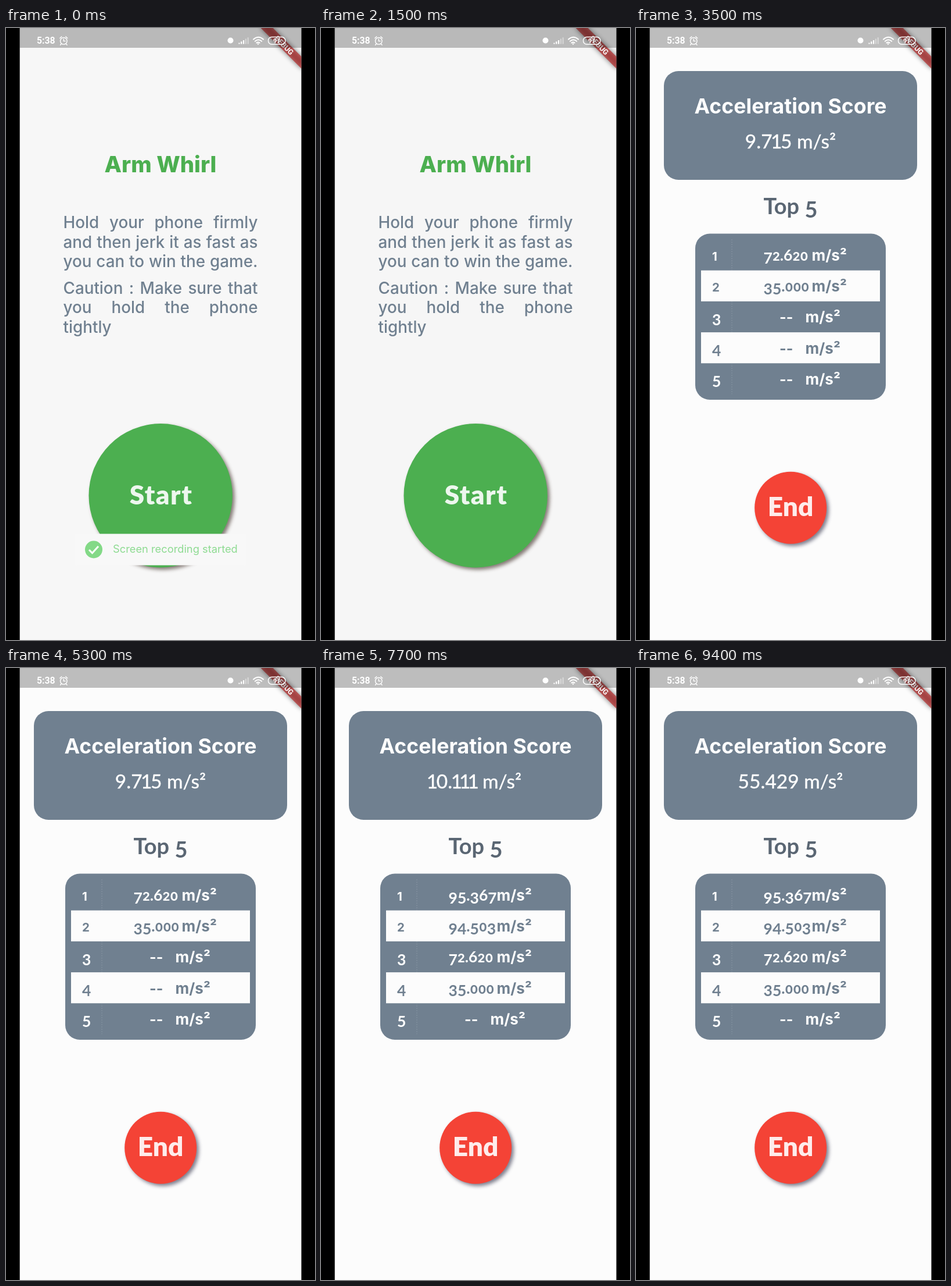
Animation, 532 px wide and 1052 px high, one loop 10000 ms. Source, as an HTML page:

```html
<!DOCTYPE html>
<html lang="en">
<head>
<meta charset="utf-8">
<title>Throw game</title>
<style>
  html, body { margin: 0; width: 100%; height: 100%; overflow: hidden; background: #000; }
  svg { display: block; width: 100vw; height: 100vh; }
  text { font-family: Inter, "Open Sans", sans-serif; white-space: pre; }
  .round, .digit { font-family: Lato, sans-serif; }
  .bold { font-weight: 700; }
  .button { font-weight: 900; font-size: 46px; fill: #fff; fill-opacity: .9; text-anchor: middle; }
  .body { font-weight: 500; font-size: 27.8px; fill: #708090; }
  .digit { font-size: 26.5px; }
  .small { font-size: 20.5px; }
  .mid { text-anchor: middle; }
  .status { font-family: Roboto, sans-serif; font-weight: 700; fill: #fff; }
</style>
</head>
<body>
<svg viewBox="0 0 532 1052">
  <defs>
    <clipPath id="screen"><rect x="23.700" width="484.800" height="1052"/></clipPath>
    <filter id="soft" x="-20%" y="-20%" width="140%" height="140%"><feGaussianBlur stdDeviation="3"/></filter>
    <filter id="halo" x="-20%" y="-150%" width="140%" height="400%"><feGaussianBlur stdDeviation="4"/></filter>
  </defs>
  <g clip-path="url(#screen)">
    <rect id="paper" width="532" height="1052"/>

    <g id="intro">
      <text class="mid" x="266" y="248" font-size="38.3" font-weight="800" fill="#4caf50">Arm Whirl</text>
      <g id="rules"></g>
      <circle cx="270" cy="807.500" r="123.700" fill="#5d4f48" opacity=".75" filter="url(#soft)"/>
      <circle cx="266.200" cy="803.700" r="123.700" fill="#4caf50"/>
      <text class="round button" x="267" y="819" letter-spacing="1.5">Start</text>
      <g id="toast">
        <rect x="118" y="869.500" width="296" height="54" rx="5" fill="#f8f8f8"/>
        <circle cx="151" cy="896.500" r="15" fill="#83d987"/>
        <path d="M143 897l5.500 5.500L159 891" fill="none" stroke="#fff" stroke-width="3"/>
        <text x="184" y="902" font-size="18.3" fill="#8edb92">Screen recording started</text>
      </g>
    </g>

    <g id="game">
      <rect x="48" y="74" width="436" height="187" rx="25" fill="#708090"/>
      <text class="bold mid" x="266" y="146.500" font-size="35.7" fill="#fff">Acceleration Score</text>
      <text class="round mid" id="score" x="266" y="206.500" font-size="33.5" fill="#fff" stroke="#fff" stroke-width=".4"></text>
      <text class="round bold mid" x="266" y="320" font-size="38" fill="#5a6673">Top <tspan dy="6">5</tspan></text>
      <rect x="102" y="353.500" width="328" height="285.500" rx="25" fill="#708090"/>
      <g id="table"></g>
      <circle cx="270" cy="828.500" r="62" fill="#4b4b60" opacity=".7" filter="url(#soft)"/>
      <circle cx="266.200" cy="824.700" r="62" fill="#f44336"/>
      <text class="round button" x="266" y="839">End</text>
    </g>

    <g transform="translate(478.800 29.700) rotate(45)">
      <rect x="-49.400" y="-7.400" width="98.800" height="14.800" opacity=".5" filter="url(#halo)"/>
      <rect x="-49.400" y="-7.400" width="98.800" height="14.800" fill="#b71c1c" opacity=".63"/>
      <text class="status mid" y="4.500" font-size="12.600" font-weight="900">DEBUG</text>
    </g>

    <rect width="532" height="34" opacity=".25"/>
    <g fill="none" stroke="#fff" stroke-width="1.4" stroke-linecap="round">
      <text class="status" x="53" y="27" font-size="15.8" stroke="none">5:38</text>
      <circle cx="99.300" cy="22.300" r="5.800"/>
      <path d="M99.300 19v3.500h2.800M92.800 17.500l3-2.800M105.800 17.500l-3-2.800M95 27.500l-1.500 1.700M103.600 27.500l1.500 1.700"/>
      <circle cx="386.500" cy="21.500" r="5" fill="#fff" stroke="none"/>
      <g id="signal"></g>
      <path d="M426 19.500q8.500-7.500 17 0M428.800 22.800q5.700-5 11.400 0M431.400 25.600q2.600-2.200 5.200 0" stroke-width="2"/>
      <circle cx="434" cy="27.500" r="1.200" fill="#fff" stroke="none"/>
      <rect x="451.500" y="15.500" width="29.500" height="12.500" rx="6"/>
      <text class="status mid" x="466" y="25.500" font-size="10.500" stroke="none">97</text>
    </g>
  </g>
</svg>
<script>
const LOOP = 10000;
const $ = id => document.getElementById(id);

const scenes = [
  { at: 0, paper: '#f7f7f7', toast: true },
  { at: 500, paper: '#f6f6f6' },
  { at: 2000, paper: '#fcfcfc', score: '10.056', top: [] },
  { at: 3500, paper: '#fcfcfc', score: '9.715', top: ['72.620', '35.000'] },
  { at: 6500, paper: '#fcfcfc', score: '10.111', top: ['95.367', '94.503', '72.620', '35.000'] },
  { at: 8500, paper: '#fcfcfc', score: '55.429', top: ['95.367', '94.503', '72.620', '35.000'] }
];

// Old-style figures: 0-2 are low, 6 and 8 rise, the others hang below the line.
function oldStyle(x, y, number) {
  let shift = 0;
  const glyphs = [...number].map(ch => {
    const drop = '34579'.includes(ch) ? 4.5 : 0;
    const dy = drop - shift;
    shift = drop;
    return `<tspan class="${'012'.includes(ch) ? 'small' : 'digit'}" dy="${dy}">${ch}</tspan>`;
  });
  return `<text class="bold" x="${x}" y="${y}">${glyphs.join('')}</text>`;
}

function tableRow(i, value) {
  const top = 363.5 + i * 53.2;
  const base = top + 36.5;
  const light = i % 2 === 1;
  const back = light
    ? `<rect x="112" y="${top}" width="308" height="53.2" fill="#fcfcfc"/>`
    : `<path d="M165 ${top}v53" stroke="#8e9ba8" stroke-dasharray="1.5 2.5"/>`;
  const number = value
    ? oldStyle(219.5, base, value)
    : `<text class="bold" x="247" y="${base}" font-size="25">--</text>`;
  return `${back}<g fill="${light ? '#708090' : '#fff'}">
    ${oldStyle(131, base, String(i + 1))}${number}
    <text class="bold" x="${value ? 302.5 : 291.5}" y="${base}" font-size="26">m/s²</text></g>`;
}

// The figure 1 sits in a narrower slot than the rest.
const scoreText = score =>
  score.replace(/1/g, '<tspan dx="-2.5" letter-spacing="-2.5">1</tspan>') + ' m/s²';

function justify(line) {
  const gaps = line.textContent.split(' ').length - 1;
  if (gaps) line.style.wordSpacing = (335 - line.getComputedTextLength()) / gaps + 'px';
}

$('rules').innerHTML = [
  [344, 'Hold your phone firmly'],
  [377.5, 'and then jerk it as fast as'],
  [411, 'you can to win the game.'],
  [456.5, 'Caution : Make sure that'],
  [490, 'you hold the phone'],
  [523.5, 'tightly']
].map(([y, words]) => `<text class="body" x="98.500" y="${y}">${words}</text>`).join('');
$('rules').querySelectorAll('text').forEach(justify);

$('signal').innerHTML = [0, 1, 2, 3, 4].map(i =>
  `<path d="M${401.5 + i * 3.8} 27.5v${-2 - i * 2.3}" stroke-width="2.2" stroke-linecap="butt" opacity="${i < 3 ? 1 : .4}"/>`
).join('');

let shown;
function draw(time) {
  const scene = scenes.findLast(s => s.at <= time % LOOP);
  if (scene === shown) return;
  shown = scene;
  const playing = Boolean(scene.score);
  $('paper').setAttribute('fill', scene.paper);
  $('intro').style.display = playing ? 'none' : '';
  $('game').style.display = playing ? '' : 'none';
  $('toast').style.display = scene.toast ? '' : 'none';
  if (playing) {
    $('score').innerHTML = scoreText(scene.score);
    $('table').innerHTML = [0, 1, 2, 3, 4].map(i => tableRow(i, scene.top[i])).join('');
  }
}

const start = performance.now();
function tick() {
  draw(performance.now() - start);
  requestAnimationFrame(tick);
}
tick();
</script>
</body>
</html>
```
